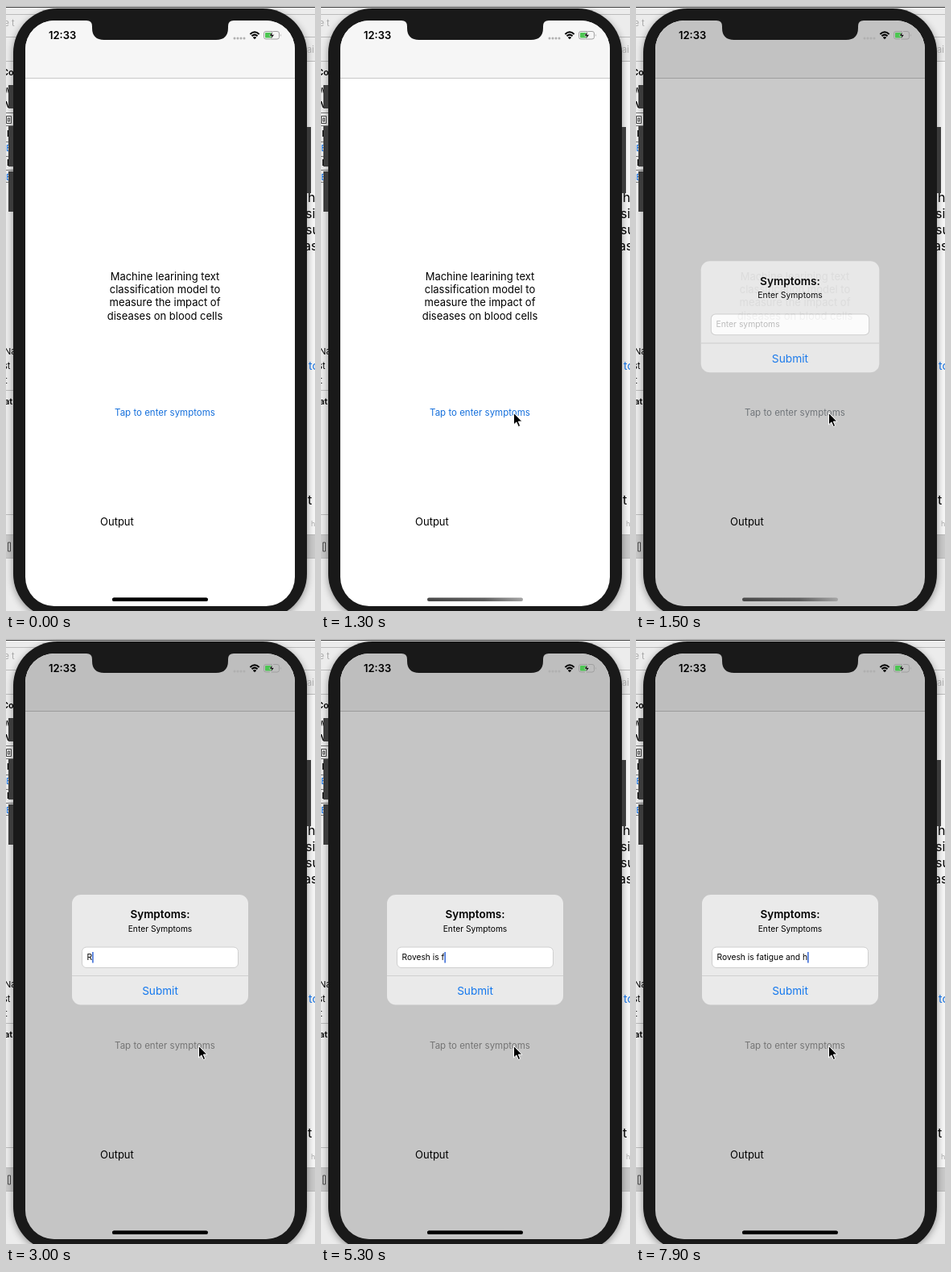
An HTML page that plays this animation: 384x750 px, repeating every 8000 ms.

```html
<!DOCTYPE html>
<html lang="en">
<head>
<meta charset="utf-8">
<title>Symptom form</title>
<style>
  html, body { margin: 0; width: 100%; height: 100%; overflow: hidden; background: #e9e9e9; }
  svg { display: block; width: 384px; height: 750px; font: 13px Inter, sans-serif; }
  text { white-space: pre; }
  .mid { text-anchor: middle; }
  .bold { font-weight: 600; }
  .blue { fill: #1670dc; }
  .gray { fill: #a8a8a8; }
  .side { font-size: 11px; }
  .field { font-size: 10.25px; }
</style>
</head>
<body>
<svg viewBox="0 0 384 750">
  <defs>
    <linearGradient id="fade"><stop stop-color="#484848"/><stop offset=".6" stop-color="#606060"/><stop offset="1" stop-color="#a4a4a4"/></linearGradient>
    <filter id="soft" x="-20%" width="140%"><feGaussianBlur stdDeviation="5"/></filter>
    <clipPath id="screen"><rect x="24" y="18" width="335" height="726" rx="36"/></clipPath>
  </defs>

  <!-- Windows behind the phone -->
  <rect width="384" height="750" fill="#ececec"/>
  <rect x="370" y="68" width="14" height="587" fill="#f6f6f6"/>
  <rect y="655" width="384" height="30" fill="#c9c9c9"/>
  <path d="M0 1.5H384" stroke="#333"/>
  <path d="M0 10.5H384M0 38.5H384M0 68.5H384M0 476.5H12M0 630.5H12M0 655.5H384M0 684.5H384" stroke="#bbb"/>
  <path d="M0 132.5H9M0 148.5H9M0 168.5H9M0 186.5H9M0 203.5H9M0 218.5H9" stroke="#777"/>
  <rect x="9" y="6" width="365" height="755" rx="55" fill="#000" opacity=".4" filter="url(#soft)"/>
  <g id="behind"></g>
  <path d="M.5 136.5H6.5V145.5H.5ZM2.5 139H4.5V143H2.5ZM2.5 665H5.5V676H2.5Z" fill="none" stroke="#444"/>
  <path d="M3 98H10V127H3ZM3 149H10V199H3ZM3 205H10V255H3ZM373 150H379V232H373Z" fill="#3c3c3c"/>

  <!-- Phone -->
  <rect x="9" y="3" width="365" height="756" rx="55" fill="#191919"/>
  <g clip-path="url(#screen)">
    <rect x="24" y="18" width="335" height="726" fill="#fff"/>
    <rect x="24" y="18" width="335" height="71" fill="#f6f6f6"/>
    <path d="M24 89.5H359" stroke="#c8c8c8"/>
    <g class="mid">
      <text x="197.5" y="339.5">Machine learining text</text>
      <text x="197.5" y="356">classification model to</text>
      <text x="197.5" y="372.3">measure the impact of</text>
      <text x="197.5" y="388.5">diseases on blood cells</text>
      <text id="tap" x="197.5" y="508" font-size="11.5">Tap to enter symptoms</text>
    </g>
    <text x="117" y="643.5">Output</text>
    <rect id="dim" x="24" y="18" width="335" height="726"/>
  </g>
  <path d="M100 17H283V18Q276 18 276 25V27Q276 42 261 42H122Q107 42 107 27V25Q107 18 100 18Z" fill="#191919"/>

  <!-- Status bar -->
  <text class="bold" x="53" y="41">12:33</text>
  <g fill="#b0b0b0">
    <circle cx="284" cy="40" r="1.5"/><circle cx="288" cy="40" r="1.5"/>
    <circle cx="292" cy="40" r="1.5"/><circle cx="296" cy="40" r="1.5"/>
  </g>
  <path d="M303.4 35Q309 29.6 314.6 35M305.5 37.3Q309 34 312.5 37.3" fill="none" stroke="#000" stroke-width="2"/>
  <path d="M306.8 39Q309 37.2 311.2 39L309 41.3Z"/>
  <rect x="320.5" y="31.5" width="19" height="9.5" rx="2.5" fill="none" stroke="#a0a0a0"/>
  <path d="M341 34.5Q342.5 36 341 38Z" fill="#a0a0a0"/>
  <rect x="322" y="33" width="8" height="6.5" rx="1" fill="#4cc552"/>
  <path d="M331.5 31.5L327 37H330L328.7 41.5L333.5 35.5H330.5Z" stroke="#fff" stroke-width=".5"/>

  <rect x="132" y="733.5" width="119" height="4.5" rx="2.2" fill="url(#fade)"/>
  <rect id="home" x="132" y="733.5" width="119" height="4.5" rx="2.2"/>

  <g id="alert">
    <rect x="82" y="317" width="219" height="136.5" rx="11" fill="#eaeaea"/>
    <text class="mid bold" x="191.5" y="346.3" font-size="13.5">Symptoms:</text>
    <text class="mid field" x="191.5" y="362.5">Enter Symptoms</text>
    <rect x="94.5" y="382" width="194" height="25.5" rx="5.5" fill="#fff" stroke="#cfcfcf"/>
    <text id="hint" class="field" x="100.5" y="398.3" fill="#bbb">Enter symptoms</text>
    <text id="typed" class="field" x="100.5" y="398.3"></text>
    <rect id="caret" y="388" width="1.6" height="13.5" fill="#3f6fd8"/>
    <path d="M82 417.5H301" stroke="#d0d0d0"/>
    <text class="mid" x="191.5" y="441" font-size="13.6" fill="#1478ee">Submit</text>
  </g>

  <path id="pointer" d="M0 0V14.5L3.4 11.4L5.8 17L8.2 16L5.8 10.6H10.4Z" stroke="#fff" stroke-width="1"/>
</svg>
<script>
const $ = id => document.getElementById(id);
const clamp = v => Math.min(1, Math.max(0, v));
const mix = (a, b, p) => a + (b - a) * p;

// Clipped labels at both edges: text, x, baseline, size, classes
const labels = [
  ["ne t", -9, 25, 11, "gray"], ["Co", -5, 86, 11, "bold"], ["w", -3, 108, 11, ""],
  ["V", -1, 126, 11, "bold"], ["L", 1, 162, 11, "bold"], ["E", 0, 180, 11, "blue"],
  ["L", 1, 198, 11, "bold"], ["E", 0, 216, 11, "blue"], ["Na", -2, 432, 11, ""],
  ["st", -4, 450, 11, ""], ["t", -2, 468, 11, ""], ["at", -2, 494, 11, "bold"],
  ["ai", 374, 58, 11, "gray"], ["h", 375, 243, 16, ""], ["si", 372, 263, 16, ""],
  ["su", 372, 283, 16, ""], ["as", 370, 303, 16, ""], ["to", 376, 451, 14, "blue"],
  ["t", 375, 618, 16, ""], ["h", 379, 645, 9, "gray"]
];
$("behind").innerHTML = labels.map(([s, x, y, size, cls]) =>
  `<text x="${x}" y="${y}" font-size="${size}" class="${cls}">${s}</text>`).join("");

const message = "Rovesh is fatigue and h";
const keyTimes = [3000, 3300, 3500, 3700, 3900, 4100, 4300, 4500, 4700, 5000, 5300, 5400,
  5600, 5800, 6000, 6200, 6400, 6500, 6700, 7000, 7400, 7600, 7900];
const opening = [0, .53, .94, .99, 1];

function render(t) {
  const p = opening[Math.min(4, Math.max(0, (t - 1300) / 100))];
  $("dim").setAttribute("opacity", .227 * p);
  $("alert").setAttribute("opacity", p);
  $("alert").setAttribute("transform",
    `translate(191.5 385) scale(${1.2 - .2 * p}) translate(-191.5 -385)`);
  $("tap").setAttribute("fill", `rgb(${mix(22, 150, p)} ${mix(112, 150, p)} ${mix(220, 150, p)})`);

  const grayHome = clamp(t / 500) - clamp((t - 1700) / 600);
  $("home").setAttribute("opacity", 1 - grayHome);

  const count = keyTimes.filter(k => k <= t).length;
  $("typed").textContent = message.slice(0, count);
  $("hint").setAttribute("opacity", count ? 0 : 1);
  $("caret").setAttribute("x", 100.5 + (count ? $("typed").getComputedTextLength() : 0));
  const blink = 1 - clamp((t - 2000) / 200) + clamp((t - 2400) / 200);
  $("caret").setAttribute("opacity", t < 1600 ? 0 : blink);

  const left = (1 - clamp((t - 800) / 500)) ** 2;
  $("pointer").setAttribute("transform", `translate(${239.5 + 150 * left} ${504.5 + 95 * left})`);
  $("pointer").setAttribute("opacity", t < 900 ? 0 : 1);
}

const start = performance.now();
function tick() {
  const t = (performance.now() - start) % 8000;
  render(Math.floor(t / 100) * 100);
  requestAnimationFrame(tick);
}
tick();
</script>
</body>
</html>
```
